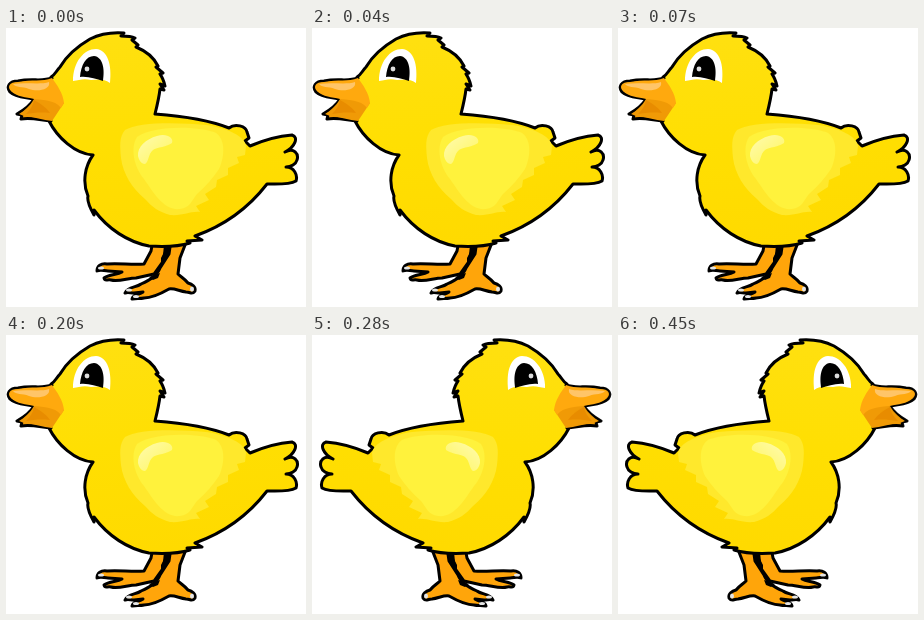
An HTML page for the animation above (0.56 s loop, 300 by 279 pixels).

```html
<!DOCTYPE html>
<html lang="en">
<head>
<meta charset="utf-8">
<title>Chick looking left and right</title>
<style>
  html, body { margin: 0; width: 100%; height: 100%; overflow: hidden; background: #fff; }
  svg { display: block; width: 300px; height: 279px; }
  .line { stroke: #000; stroke-width: 3; stroke-linejoin: round; stroke-linecap: round; }
</style>
</head>
<body>
<svg viewBox="0 0 300 279">
  <defs>
    <linearGradient id="down" gradientUnits="userSpaceOnUse" x1="110" y1="5" x2="135" y2="218">
      <stop offset="0" stop-color="#ffe010"/>
      <stop offset=".5" stop-color="#ffdf02"/>
      <stop offset="1" stop-color="#ffda00"/>
    </linearGradient>
    <linearGradient id="shine" x1="0" y1="0" x2="1" y2="1">
      <stop offset="0" stop-color="#fffbb0"/>
      <stop offset="1" stop-color="#fff65c"/>
    </linearGradient>
  </defs>

  <g id="chick">
    <!-- legs and feet -->
    <g class="line" fill="#ffa50a">
      <path d="M147 212 L145 223 L138 236 C126 237 113 235 101 236 C95 235 91 238 91 243
        C95 241 98 243 102 243 L116 244 C111 247 103 246 98 250 C99 254 101 251 105 252
        C113 254 122 250 130 250 L148 246 L158 232 L160 212Z"/>
      <path d="M165 212 L163 226 L154 240 C151 248 144 252 135 256 C130 260 122 258 119 265
        C122 264 124 265 128 265 L137 264 C133 267 127 266 126 271 C130 270 134 271 138 270
        C147 270 156 265 163 261 C168 260 173 263 180 264 C185 264 186 267 189 263
        C190 259 186 256 182 255 C179 251 175 249 172 246 L174 230 L181 212Z"/>
    </g>
    <path d="M161 218 L165 218 L162 229 L155 236 L155 230Z M143 249 L154 245 L152 250 L147 252Z"/>
    <g fill="#e5e5e5">
      <ellipse cx="95" cy="240" rx="3" ry="1.6"/>
      <ellipse cx="123" cy="262" rx="3" ry="1.6"/>
      <ellipse cx="130" cy="268.500" rx="3" ry="1.500"/>
      <ellipse cx="186" cy="261" rx="2" ry="2.500"/>
    </g>

    <!-- body, head and tail -->
    <path class="line" fill="url(#down)" d="M45 49 C49 47 50 43 54 39 C61 27 72 18 84 11
      C94 6 105 4 118 5 L115 8 C121 8 125 8 129 10 L126 12 L132 17 L130 19
      C140 23 148 30 152 38 L150 39 L157 45 L154 46 C157 50 158 54 159 58 L154 56 L158 62 L154 61
      C153 70 151 78 149 86 C176 88 203 92 223 100 C229 95 240 98 241 104 L243 110 L239 113
      L244 118 C258 112 273 108 286 107 C293 109 289 119 279 124
      C288 119 293 126 291 132 C290 136 285 139 280 139
      C288 139 292 147 290 153 C283 157 271 156 261 156
      C244 178 220 197 189 208 L196 212 L181 213 L184 215
      C171 219 158 219 143 218 C122 214 102 201 88 182 L88 187
      C84 180 81 172 82 168 C76 154 79 138 87 127 C69 126 51 109 43 93Z"/>

    <!-- wing tones -->
    <path fill="#ffe82c" d="M119 102 C131 94 170 94 200 97 C221 100 239 108 240 118
      L239 127 L231 129 L233 135 L222 140 L222 147 L211 152 L210 159 L199 166 L203 172
      L190 178 L194 184 C184 183 178 188 164 187 C153 184 146 179 139 171
      C126 160 117 146 115 130 C114 118 113 109 119 102Z"/>
    <path fill="#fff23c" d="M131 109 C147 97 191 98 208 104 C220 109 219 129 213 141
      C207 150 200 158 191 166 C186 172 184 180 174 181 C158 183 147 164 138 151
      C128 139 124 120 131 109Z"/>
    <path fill="url(#shine)" d="M132 128 C131 119 140 111 151 108 C161 105 168 110 166 115
      C161 119 151 119 147 122 C142 126 143 134 139 136 C135 136 133 132 132 128Z"/>

    <!-- beak -->
    <path class="line" fill="#f09a06" d="M46 50 C36 54 26 50 12 53 C3 53 0 59 4 64
      C10 70 20 69 28 71 C24 78 18 82 11 86 L16 87 L15 91 C25 89 34 92 45 93"/>
    <path fill="#f09a06" d="M28 71 C24 78 18 83 13 86 L18 88 C28 89 37 92 46 93 L58 75 L45 70Z"/>
    <path fill="#ffa90e" d="M46 50 C36 54 26 51 12 54 C3 54 1 59 5 63 C11 69 20 69 28 71
      C38 72 49 72 55 80 L58 75 C57 65 51 57 46 50Z"/>
    <path fill="#e88c00" d="M28 72 C35 76 41 80 44 85 C34 84 27 85 20 86 C24 82 27 78 28 72Z"/>
    <path fill="#ffc568" d="M7 56 C20 54 35 57 43 54 C45 62 31 64 23 61 C16 58 10 60 7 56Z"/>

    <!-- eye -->
    <path fill="#fff" d="M67 53 C67 34 78 21 90 21 C102 22 106 37 104 55 C97 50 91 52 85 52 C78 50 73 52 67 53Z"/>
    <path d="M74 49 C75 37 80 28 88 28 C97 29 99 41 97 53 C90 51 82 48 74 49Z"/>
    <circle cx="81" cy="41" r="2.400" fill="#ddd"/>
  </g>
</svg>
<script>
  const facing = { left: "none", right: "translate(300px, 0) scale(-1, 1)" };
  const steps = [
    [0, "left"],
    [0.5, "right"],
    [1, "right"]
  ];
  document.getElementById("chick").animate(
    steps.map(([offset, side]) => ({ offset, transform: facing[side], easing: "step-end" })),
    { duration: 560, iterations: Infinity }
  );
</script>
</body>
</html>
```
